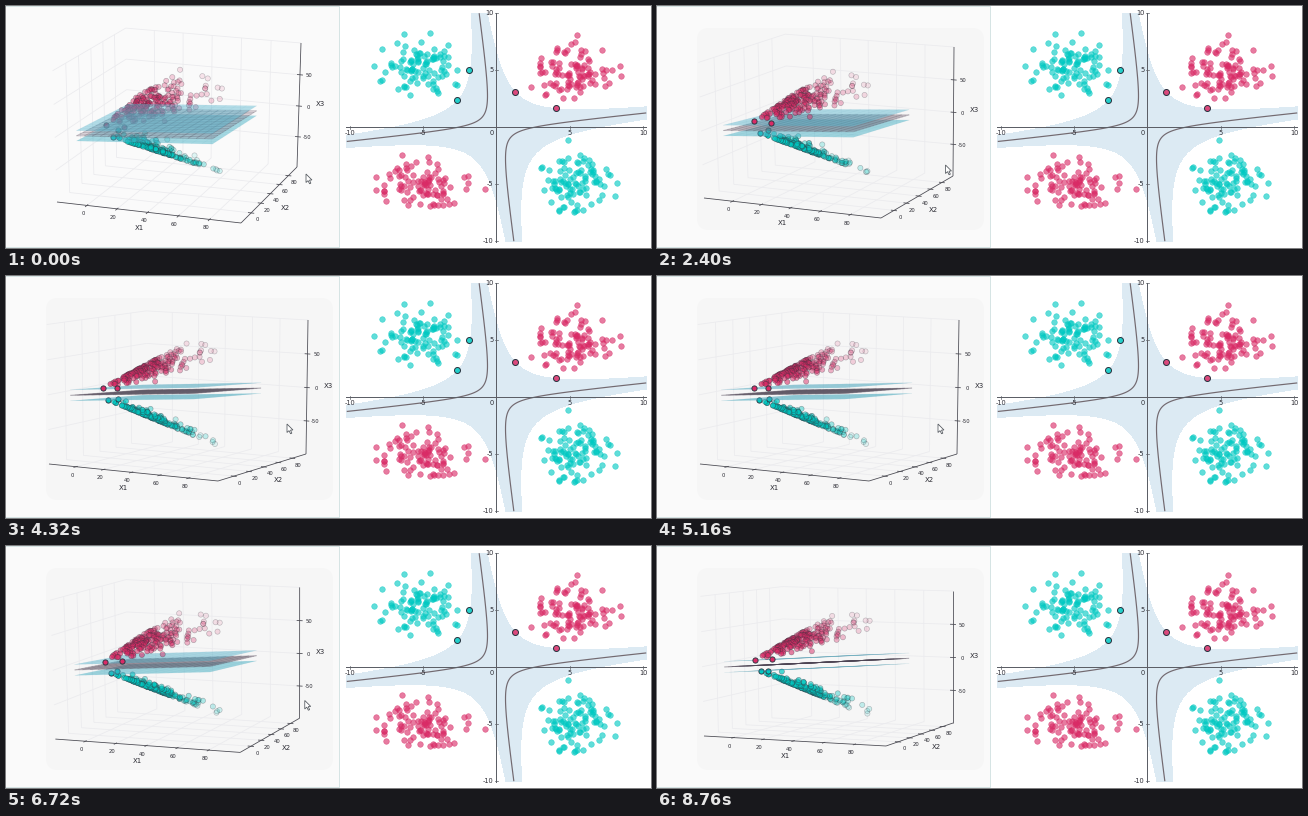
Recreate the animation shown at these times as a matplotlib script. Size 645 px wide and 242 px high, loop 8880 ms.

```python
import numpy as np
import matplotlib.pyplot as plt
from matplotlib.animation import FuncAnimation
from matplotlib.collections import LineCollection, PolyCollection
from matplotlib.patches import FancyBboxPatch, Polygon, Rectangle

W, H, DPI = 645, 242, 64
FRAMES, STEP = 74, 120
PT = 72 / DPI                      # points per pixel

TEAL, PINK = (0.0, 0.79, 0.76), (0.85, 0.17, 0.40)
DARK, GRID = "#4a4a52", "#ebebee"
MARGIN = 5.6

# Box corners A, B, C (floor), D (top of the X3 axis), pointer tip
POSES = np.array([
    [51, 196, 235, 217, 291, 161, 295, 37, 300, 168],
    [49, 195, 232, 214, 290, 166, 294, 39, 298, 162],
    [47, 192, 224, 212, 296, 170, 297, 41, 288.5, 159],
    [43, 188, 212, 205, 300, 178, 302, 44, 281, 148],
    [48, 194, 229, 212, 295, 168, 296, 40, 295.5, 161],
    [51, 192, 240, 200, 292, 177, 291, 43, 302.5, 147],
    [47, 190, 229, 200, 296, 177, 296, 45, 296, 148],
])
KEY_TIMES = [0, 1080, 2400, 3000, 4200, 4700, 5400, 6000, 6300, 7200, 7700, 8500]
KEY_POSES = [0, 1, 2, 2, 3, 3, 3, 4, 4, 5, 5, 6]


def pose_at(ms):
    cols = POSES[KEY_POSES].T
    return np.array([np.interp(ms, KEY_TIMES, c) for c in cols])


def camera(pose):
    """Homogeneous 3x4 matrix that sends the box corners to their pixels."""
    a, b, c, d = pose[:8].reshape(4, 2)
    turn = np.arctan2(c[0] - b[0], b[0] - a[0])
    wb = 9.4
    wa = wb + 0.96 * np.sin(turn)
    wc = wb + 0.96 * np.cos(turn)
    wd = wc - (b[1] - c[1]) / 165
    ha, hb, hc, hd = (np.append(p * w, w)
                      for p, w in ((a, wa), (b, wb), (c, wc), (d, wd)))
    return np.column_stack([hb - ha, hc - hb, hd - hc, ha])


def project(cam, pts):
    """Pixel positions and depths of (X1, X2, X3) points."""
    pts = np.asarray(pts, float)
    unit = (pts - [-20, -20, -100]) / [120, 120, 200]
    h = unit @ cam[:, :3].T + cam[:, 3]
    return h[..., :2] / h[..., 2:], h[..., 2]


def decision(x, y):
    return x * y - 0.133 * x**2 + 0.111 * y**2 + 0.9


def lift(p):
    """Quadratic feature map of the flat data."""
    x, y = p.T
    return np.column_stack([x**2, y**2, np.sqrt(2) * x * y])


def plane(x, y, level=0.0):
    return np.sqrt(2) * (0.133 * x - 0.111 * y - 0.9 + level)


def cluster(rng, cx, cy, n=92):
    pts = []
    while len(pts) < n:
        u, v = rng.normal(0, 1, 2)
        p = cx + 1.6 * u, cy + 1.25 * v
        if u * u + v * v < 4.4 and abs(decision(*p)) > 7:
            pts.append(p)
    return pts


rng = np.random.default_rng(12)
teal_sv = [(-1.84, 4.98), (-2.72, 2.42)]
pink_sv = [(1.23, 3.13), (4.02, 1.72)]
teal = np.array(cluster(rng, -5.3, 5.2) + cluster(rng, 5.2, -5.0)
                + [(4.85, -1.1), (-6.3, 8.2), (-4.5, 8.3), (8.2, -4.9)] + teal_sv)
pink = np.array(cluster(rng, 5.0, 4.9) + cluster(rng, -5.1, -4.8)
                + [(-0.8, -5.4), (5.5, 8.1), (8.4, 5.4), (8.5, 4.5)] + pink_sv)

fig = plt.figure(figsize=(W / DPI, H / DPI), dpi=DPI, facecolor="white")
ax = fig.add_axes([0, 0, 1, 1])
ax.set_xlim(0, W)
ax.set_ylim(H, 0)
ax.axis("off")


def label(x, y, s, size, align="center"):
    return ax.text(x, y, s, fontsize=size * PT, color="#2c2c34", ha=align,
                   va="center", family="DejaVu Sans", zorder=9)


# ---- flat plot -------------------------------------------------------
def flat(x, y):
    return 490.5 + 14.68 * np.asarray(x), 121.2 - 11.4 * np.asarray(y)


def flat_line(x, y, width=1.0):
    ax.plot(x, y, color="#5c5f66", lw=width * PT, zorder=2)


def draw_flat():
    gx, gy = np.meshgrid(np.linspace(-10.2, 10.2, 300), np.linspace(-10, 10, 300))
    field = decision(gx, gy)
    px, py = flat(gx, gy)
    ax.contourf(px, py, field, levels=[-MARGIN, MARGIN], colors=["#dceaf3"], zorder=1)
    ax.contour(px, py, field, levels=[0], colors=["#736a70"],
               linewidths=1.2 * PT, zorder=2)
    flat_line([340, 640], [121, 121])
    flat_line([490, 490], [7, 236])
    for v in (-10, -5, 5, 10):
        x, y = flat(v, v)
        flat_line([x, x], [119.5, 122.5], 0.7)
        flat_line([489, 492], [y, y], 0.7)
        label(x, 127, str(v), 6.6)
        label(487.5, y, str(v), 6.6, "right")
    label(486, 127, "0", 6.6)
    for pts, color in ((teal, TEAL), (pink, PINK)):
        x, y = flat(*pts[:-2].T)
        ax.scatter(x, y, s=(5.6 * PT)**2, color=[color + (0.62,)],
                   edgecolors=[color + (0.6,)], linewidths=0.6 * PT, zorder=4)
        x, y = flat(*pts[-2:].T)
        ax.scatter(x, y, s=(6 * PT)**2, color=[color + (0.85,)],
                   edgecolors="#2a3440", linewidths=PT, zorder=5)


draw_flat()

# ---- panel behind the 3D plot ----------------------------------------
ax.add_patch(Rectangle((-2, 0), 335, 241, fc="#fafafa", ec="#d6e4e4",
                       lw=PT, zorder=0))
square_back = ax.add_patch(Rectangle((46, 22), 270, 201, fc="#f7f7f7",
                                     ec="none", zorder=0.5))
round_back = ax.add_patch(FancyBboxPatch(
    (52, 34), 263, 178, boxstyle="round,pad=12,rounding_size=12",
    fc="#f6f6f6", ec="none", zorder=0.5))

# ---- 3D plot ---------------------------------------------------------
TICKS, Z_TICKS = (0, 20, 40, 60, 80), (50, 0, -50)
LO, HI, ZB = -20, 100, 100


def grid_lines():
    lines = []
    for v in TICKS:
        lines += [[(v, LO, -ZB), (v, HI, -ZB)], [(v, HI, -ZB), (v, HI, ZB)],
                  [(LO, v, -ZB), (HI, v, -ZB)], [(LO, v, -ZB), (LO, v, ZB)]]
    for z in Z_TICKS + (ZB,):
        lines += [[(LO, LO, z), (LO, HI, z)], [(LO, HI, z), (HI, HI, z)]]
    return np.array(lines, float)


def axis_lines():
    lines = [[(LO, LO, -ZB), (HI, LO, -ZB)], [(HI, LO, -ZB), (HI, HI, -ZB)],
             [(HI, HI, -ZB), (HI, HI, ZB)]]
    for v in TICKS:
        lines += [[(v, LO - 3, -ZB), (v, LO + 2, -ZB)],
                  [(HI - 2, v, -ZB), (HI + 2, v, -ZB)]]
    lines += [[(HI - 2, HI, z), (HI + 2, HI, z)] for z in Z_TICKS]
    return np.array(lines, float)


P0, P1 = -10, 78


def sheet(level):
    x = np.array([P0, P1, P1, P0], float)
    y = np.array([P0, P0, P1, P1], float)
    return np.column_stack([x, y, plane(x, y, level)])


def mesh(level, n):
    lines = []
    for v in np.linspace(P0, P1, n):
        for p, q in (((v, P0), (v, P1)), ((P0, v), (P1, v))):
            lines.append([(*p, plane(*p, level)), (*q, plane(*q, level))])
    return np.array(lines, float)


def add_lines(pts, color, width, z):
    art = LineCollection([], colors=[color], linewidths=width * PT, zorder=z)
    ax.add_collection(art)
    return art, pts


def add_sheet(level, color, z):
    art = PolyCollection([], facecolors=[color], edgecolors="none", zorder=z)
    ax.add_collection(art)
    return art, sheet(level)


line_sets = [
    add_lines(grid_lines(), GRID, 0.8, 1),
    add_lines(axis_lines(), DARK, 0.8, 2),
    add_lines(mesh(-MARGIN, 14), (0.2, 0.55, 0.65, 0.08), 0.5, 4.1),
    add_lines(mesh(0, 18), (0.30, 0.27, 0.33, 0.28), 0.9, 4.3),
    add_lines(mesh(MARGIN, 14), (0.2, 0.55, 0.65, 0.08), 0.5, 4.5),
]
sheets = [
    add_sheet(-MARGIN, (0.30, 0.71, 0.79, 0.5), 4.0),
    add_sheet(0, (0.62, 0.50, 0.58, 0.25), 4.2),
    add_sheet(MARGIN, (0.36, 0.72, 0.82, 0.45), 4.4),
]


def add_cloud(pts, color, z):
    """Dots that fade with their distance from the origin, and two marked ones."""
    data = lift(pts[:-2])
    reach = data[:, 0] + data[:, 1]
    far = (reach - reach.min()) / np.ptp(reach)
    data, far = data[np.argsort(-far)], np.sort(far)[::-1]
    face = [color + (0.72 - 0.62 * f,) for f in far]
    edge = [(0.2, 0.2, 0.24, 0.5 - 0.2 * f) for f in far]
    dots = ax.scatter(*data[:, :2].T, s=(5.2 * PT)**2, c=face, edgecolors=edge,
                      linewidths=0.6 * PT, zorder=z)
    marked = ax.scatter([0, 0], [0, 0], s=(5.2 * PT)**2, color=[color],
                        edgecolors="#2a3440", linewidths=0.9 * PT, zorder=z + 0.1)
    return (dots, data), (marked, lift(pts[-2:]))


teal_cloud = add_cloud(teal, TEAL, 3)
pink_cloud = add_cloud(pink, PINK, 5)

x_ticks = [label(0, 0, str(v), 5.2) for v in TICKS]
y_ticks = [label(0, 0, str(v), 5.2) for v in TICKS]
z_ticks = [label(0, 0, str(v), 5.2) for v in Z_TICKS]
names = [label(0, 0, s, 7) for s in ("X1", "X2", "X3")]

ARROW = 0.85 * np.array([(0, 0), (0, 10), (2.4, 7.8), (4.2, 11.5),
                         (5.7, 10.8), (4.1, 7.2), (7, 7)])
pointer = ax.add_patch(Polygon(ARROW, closed=True, fc="white", ec="#555a60",
                               lw=0.8 * PT, zorder=10))


def place_labels(cam, pose):
    a, b, c, d = pose[:8].reshape(4, 2)
    for v, tx, ty in zip(TICKS, x_ticks, y_ticks):
        tx.set_position(project(cam, (v, LO, -ZB))[0] + (-4, 8.5))
        ty.set_position(project(cam, (HI, v, -ZB))[0] + (6, 7))
    for v, tz in zip(Z_TICKS, z_ticks):
        tz.set_position(project(cam, (HI, HI, v))[0] + (9, 1))
    names[0].set_position((a + b) / 2 + (-10, 15))
    names[1].set_position((b + c) / 2 + (16.5, 12.5))
    names[2].set_position((c + d) / 2 + (21, -1))


def draw(i):
    pose = pose_at(i * STEP)
    cam = camera(pose)
    for art, pts in line_sets:
        art.set_segments(project(cam, pts)[0])
    for art, pts in sheets:
        art.set_verts([project(cam, pts)[0]])
    for art, pts in teal_cloud + pink_cloud:
        art.set_offsets(project(cam, pts)[0])
    # a steep view sorts the sheets in front of the upper cloud
    steep = pose[5] < 163
    for art, _ in pink_cloud:
        art.set_zorder(3.5 if steep else 5)
    place_labels(cam, pose)
    pointer.set_xy(ARROW + pose[8:10])
    pointer.set_visible(i < FRAMES - 1)
    square_back.set_visible(0 < i < 16)
    round_back.set_visible(i >= 16)
    return []


anim = FuncAnimation(fig, draw, frames=FRAMES, interval=STEP,
                     init_func=lambda: draw(0), repeat=True, repeat_delay=0)
plt.show()
```
